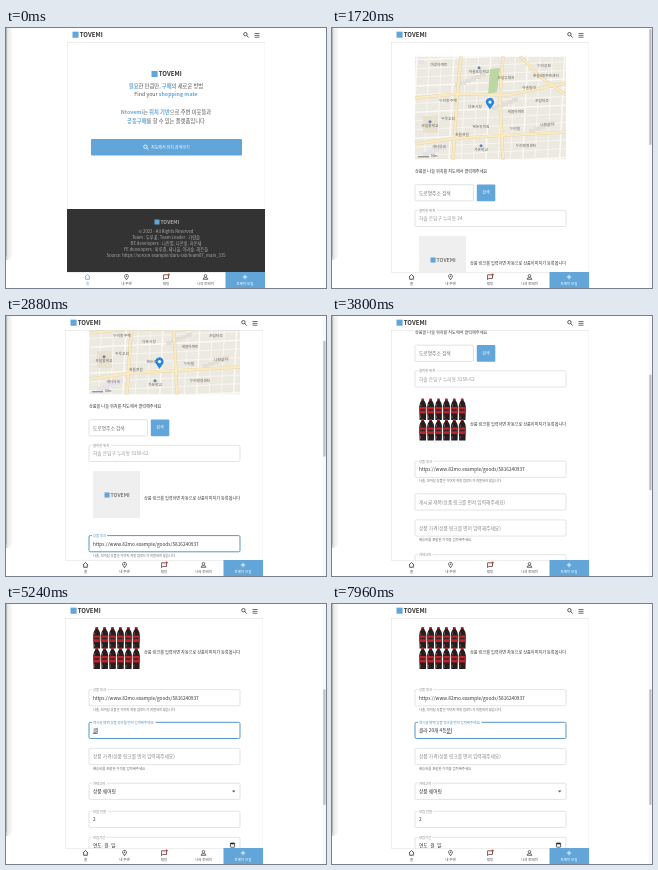
An HTML page with a canvas that plays this animation: 320 px wide and 260 px high, repeating every 8000 ms.

```html
<!DOCTYPE html>
<html lang="ko">
<head>
<meta charset="utf-8">
<style>
  html, body { margin: 0; width: 100%; height: 100%; overflow: hidden; background: #fff; }
  canvas { display: block; width: 320px; height: 260px; }
</style>
</head>
<body>
<canvas id="stage"></canvas>
<script>
const W = 320, H = 260, LOOP = 8000;
const BLUE = '#62a6d9', INK = '#333', GRAY = '#888', LINE = '#d0d0d0';
const FONT = '"Noto Sans CJK KR", "Noto Sans CJK", "Noto Sans", sans-serif';
const BRAND = 'TOVEMI';

const canvas = document.getElementById('stage');
const ctx = canvas.getContext('2d');
const dpr = window.devicePixelRatio || 1;
canvas.width = W * dpr;
canvas.height = H * dpr;

// Moments of the interaction, in ms
const OPEN = 560, MAP_READY = 920, PICK = 1800;
const LINK_FOCUS = 2640, LINK_PASTE = 2880, PHOTO = 3160, LINK_BLUR = 3440;
const TITLE_FOCUS = 4760;
const SCROLLS = [[1920, 2300, 0, 53], [3440, 3780, 53, 127.5], [4040, 4560, 127.5, 187]];
const KEYS = [
  [5080, 'ㅋ', 1], [5140, '코', 1], [5200, '콜', 1], [5360, '콜ㄹ', 1], [5480, '콜라', 1],
  [5720, '콜라 '], [5960, '콜라 2'], [6120, '콜라 20'], [6360, '콜라 20ㄱ', 1],
  [6480, '콜라 20개', 1], [6760, '콜라 20개'], [6960, '콜라 20개 '], [7160, '콜라 20개 4'],
  [7360, '콜라 20개 4ㄷ', 1], [7440, '콜라 20개 4드', 1], [7520, '콜라 20개 4등', 1],
  [7720, '콜라 20개 4등ㅂ', 1], [7800, '콜라 20개 4등부', 1], [7880, '콜라 20개 4등분', 1]
];

const clamp = v => Math.max(0, Math.min(1, v));
const span = (t, a, b) => clamp((t - a) / (b - a));
const ease = v => v * v * (3 - 2 * v);
const mix = (a, b, k) => a + (b - a) * k;

function box(x, y, w, h, color) {
  ctx.fillStyle = color;
  ctx.fillRect(x, y, w, h);
}

function round(x, y, w, h, r, fill, stroke, width = .5) {
  ctx.beginPath();
  ctx.roundRect(x, y, w, h, r);
  if (fill) { ctx.fillStyle = fill; ctx.fill(); }
  if (stroke) { ctx.strokeStyle = stroke; ctx.lineWidth = width; ctx.stroke(); }
}

function path(points, color, width, close) {
  ctx.beginPath();
  points.forEach(([x, y]) => ctx.lineTo(x, y));
  if (close) ctx.closePath();
  ctx.strokeStyle = color;
  ctx.lineWidth = width;
  ctx.stroke();
}

function disc(x, y, r, fill, stroke, width) {
  ctx.beginPath();
  ctx.arc(x, y, r, 0, 7);
  if (fill) { ctx.fillStyle = fill; ctx.fill(); }
  if (stroke) { ctx.strokeStyle = stroke; ctx.lineWidth = width; ctx.stroke(); }
}

function setFont(size, weight = 400) {
  ctx.font = `${weight} ${size}px ${FONT}`;
}

function text(str, x, y, size, color = INK, align = 'left', weight = 400) {
  setFont(size, weight);
  ctx.textAlign = align;
  ctx.textBaseline = 'alphabetic';
  ctx.fillStyle = color;
  ctx.fillText(str, x, y + size * .36);
}

// Centered line; parts between asterisks are blue and bold
function richLine(str, cx, y, size) {
  const parts = str.split('*').map((s, i) => ({ s, hot: i % 2 }));
  let total = 0;
  for (const p of parts) {
    setFont(size, p.hot ? 700 : 400);
    total += p.w = ctx.measureText(p.s).width;
  }
  let x = cx - total / 2;
  for (const p of parts) {
    text(p.s, x, y, size, p.hot ? BLUE : '#555', 'left', p.hot ? 700 : 400);
    x += p.w;
  }
}

function logo(x, y, size, color = INK) {
  box(x, y - size * .5, size, size, BLUE);
  text(BRAND, x + size * 1.18, y, size, color, 'left', 700);
}

function searchIcon(x, y, color, s = 1) {
  disc(x - .6 * s, y - .6 * s, 1.7 * s, null, color, .8 * s);
  path([[x + .7 * s, y + .7 * s], [x + 2.6 * s, y + 2.6 * s]], color, .9 * s);
}

function header(dx) {
  box(59 + dx, 0, 198, 14, '#fff');
  box(59 + dx, 14, 198, .5, '#d8d8d8');
  logo(64.5 + dx, 6.7, 6.1);
  searchIcon(238 + dx, 6.8, INK);
  for (let i = 0; i < 3; i++) box(246.5 + dx, 5 + i * 1.9, 5, .7, INK);
}

function nav(dx, home, t) {
  const left = 59 + dx, y = 249;
  box(left, 244, 198, 16, '#fff');
  box(left, 244, 198, .5, '#ddd');
  const xs = [79.5, 118.5, 158, 197.5, 237].map(x => x + dx);
  const first = home ? BLUE : INK;
  path([[xs[0] - 2.6, y], [xs[0], y - 2.5], [xs[0] + 2.6, y]], first, .8);
  path([[xs[0] - 1.8, y - .4], [xs[0] - 1.8, y + 2.3], [xs[0] + 1.8, y + 2.3], [xs[0] + 1.8, y - .4]], first, .8);
  ctx.beginPath();
  ctx.arc(xs[1], y - .8, 1.9, Math.PI * .85, Math.PI * 2.15);
  ctx.lineTo(xs[1], y + 2.8);
  ctx.closePath();
  ctx.strokeStyle = INK; ctx.lineWidth = .7; ctx.stroke();
  disc(xs[1], y - .8, .6, INK);
  path([[xs[2] - 2.4, y + 2.7], [xs[2] - 2.4, y - 2.2], [xs[2] + 2.5, y - 2.2], [xs[2] + 2.5, y + 1.4], [xs[2] - 1.2, y + 1.4]], '#5b3038', .8, true);
  disc(xs[2] + 2.7, y - 2.4, 1.1, '#d9363e');
  disc(xs[3], y - 1.2, 1.3, null, INK, .7);
  path([[xs[3] - 2.4, y + 2.3], [xs[3] - 2, y + 1.1], [xs[3], y + .6], [xs[3] + 2, y + 1.1], [xs[3] + 2.4, y + 2.3]], INK, .7, true);
  box(left + 158.5, 244, 39.5, 16, BLUE);
  const ripple = span(t, 160, 760);
  if (ripple > 0 && ripple < 1) {
    ctx.save();
    ctx.beginPath();
    ctx.rect(left + 158.5, 244, 39.5, 16);
    ctx.clip();
    disc(xs[4], 252, 4 + 22 * ripple, `rgba(255,255,255,${.3 * (1 - ripple)})`);
    ctx.restore();
  }
  box(xs[4] - 2.3, y - .4, 4.6, .8, '#fff');
  box(xs[4] - .4, y - 2.3, .8, 4.6, '#fff');
  ['홈', '내 주변', '채팅', '나의 토베미', '토베미 모집'].forEach((s, i) =>
    text(s, xs[i], 255.6, 3.5, i === 4 ? '#fff' : i ? '#555' : home ? BLUE : '#555', 'center'));
}

function homePage() {
  logo(145.5, 46, 6.1);
  richLine('*필요*한 만큼만, *구매*의 새로운 방법', 160, 58, 5.3);
  richLine('Find your *shopping mate*', 160, 66.3, 5.3);
  richLine('*Ntovemi*는 *위치 기반*으로 주변 이웃들과', 160, 84.5, 5.3);
  richLine('*공동구매*를 할 수 있는 플랫폼입니다', 160, 92.7, 5.3);
  round(85, 111, 151, 16.5, 1, BLUE);
  searchIcon(140, 119.3, '#fff');
  text('지도에서 위치 검색하기', 145, 119.3, 4, '#fff');
  box(61, 181, 198, 63, '#333');
  logo(148.5, 194, 5, '#aaa');
  ['© 2023 - All Rights Reserved', 'Team : 두루꽃, Team Leader : 가람솔',
    'BE developers : 나린별, 다온빛, 라온새', 'FE developers : 마루결, 새나울, 아라숲, 해든들',
    'Source: https://sorcen.example/duru-lab/team07_main_315']
    .forEach((s, i) => text(s, 160, 203 + i * 6.1, 4.25, '#aaa', 'center'));
}

const PLACES = [
  ['마루아파트', 107, 37], ['하솔초등학교', 147, 44], ['은담우체국', 174, 50], ['누리공원', 212, 38],
  ['한들4동주민센터', 214, 48], ['하솔빌라', 197, 60], ['누리동 주택', 116, 73], ['다온시장', 143, 79],
  ['은담타운', 210, 73], ['새봄아파트', 184, 84], ['두루교회', 116, 91], ['은담중학교', 98, 98],
  ['해든유치원', 149, 99], ['누리빌', 183, 101], ['나린상가', 215, 97], ['한들연립', 130, 107],
  ['누리행정센터', 194, 118], ['가온학교', 149, 122], ['새터약국', 107, 119]
];

function drawMap(t) {
  ctx.save();
  ctx.beginPath();
  ctx.rect(83, 28.5, 151, 103);
  ctx.clip();
  box(83, 28.5, 151, 103, '#ece9e1');
  if (t >= MAP_READY) {
    for (let i = 0; i < 13; i++) {
      const x = 85 + i * 12.3, y = 28 + i * 8.7;
      path([[x, 28], [x - 5, 132]], '#faf9f5', i % 3 ? .8 : 1.5);
      path([[83, y + 4], [234, y - 3]], '#faf9f5', i % 3 ? .8 : 1.5);
    }
    for (let i = 0; i < 22; i++)
      box(86 + (i * 37) % 143, 32 + (i * 23) % 94, 6, 4, i % 4 ? '#e3dfd6' : '#e5e2eb');
    box(91, 88, 15, 17, '#e8e1d0');
    ctx.beginPath();
    [[158, 41], [168, 40], [165, 64], [156, 66]].forEach(p => ctx.lineTo(...p));
    ctx.fillStyle = '#bcd7a4';
    ctx.fill();
    const roads = [
      [[83, 70], [125, 66], [177, 67], [234, 55]], [[129, 28], [125, 70], [121, 132]],
      [[171, 28], [168, 70], [171, 132]], [[83, 116], [125, 110], [234, 104]],
      [[188, 28], [207, 48], [234, 67]]
    ];
    roads.forEach(r => path(r, '#ddd0ad', 3.2));
    roads.forEach(r => path(r, '#fbeac0', 2.5));
    for (const [s, x, y] of PLACES) {
      text(s, x, y, 3.7, '#65615c', 'center');
      if (s.endsWith('학교')) disc(x, y - 4.2, 1.5, '#6684b4');
    }
    box(86, 128.5, 11, .7, '#444');
    text('50m', 99, 128, 3.2, '#444');
    const [x, y] = t < PICK ? [158, 81.5] : [153.5, 106];
    ctx.beginPath();
    ctx.arc(x, y - 7.4, 4.1, Math.PI * .87, Math.PI * 2.13);
    ctx.lineTo(x, y);
    ctx.closePath();
    ctx.fillStyle = '#2485dd';
    ctx.fill();
    disc(x, y - 7.4, 1.6, '#fff');
  }
  ctx.restore();
}

function field(y, label, value, { x = 83, w = 151, float = 1, focus = false, color = INK } = {}) {
  const edge = focus ? '#5796c7' : LINE;
  round(x, y, w, 16.2, 1.3, '#fff', edge, focus ? 1 : .6);
  if (label) {
    const size = mix(4.75, 3.4, float);
    setFont(size);
    if (float > .5) box(x + 3, y - 1, ctx.measureText(label).width + 2, 2, '#fff');
    text(label, x + 4, mix(y + 8.1, y + .2, float), size, focus ? '#5796c7' : GRAY);
  }
  if (value) text(value, x + 4, y + 8.3, 4.75, color);
}

function bottle(x, y) {
  round(x + 2.3, y, 2.8, 2.2, .5, '#c02126');
  ctx.beginPath();
  ctx.moveTo(x + 2.5, y + 1.8);
  ctx.lineTo(x + 5, y + 1.8);
  ctx.quadraticCurveTo(x + 7.4, y + 5, x + 7.3, y + 8);
  ctx.lineTo(x + 7, y + 21.5);
  ctx.lineTo(x + .6, y + 21.5);
  ctx.lineTo(x + .2, y + 8);
  ctx.quadraticCurveTo(x + .2, y + 5, x + 2.5, y + 1.8);
  ctx.fillStyle = '#291e1f';
  ctx.fill();
  box(x + .4, y + 8.5, 6.8, 6.5, '#bd2329');
  box(x + 1.2, y + 10.8, 4.9, 1.4, '#302022');
  box(x + 1.4, y + 5.5, .7, 2.5, '#78645c');
  box(x + 1.2, y + 17, .7, 3, '#78645c');
}

function photo() {
  for (let row = 0; row < 2; row++)
    for (let i = 0; i < 6; i++) bottle(87 + i * 7.9, 210 + row * 20.5);
}

function titleField(t) {
  const y = 305.3, focus = t >= TITLE_FOCUS;
  const key = KEYS.filter(k => k[0] <= t).pop();
  const value = key ? key[1] : '';
  field(y, '게시글 제목(상품 링크를 먼저 입력해주세요)', value,
    { float: ease(span(t, TITLE_FOCUS, TITLE_FOCUS + 200)), focus });
  if (!focus) return;
  setFont(4.75);
  const end = 87 + ctx.measureText(value).width;
  if (key && key[2]) {
    const w = ctx.measureText(value.slice(-1)).width;
    box(end - w, y + 11, w, .6, INK);
  }
  const last = key ? key[0] : TITLE_FOCUS;
  if ((t - last) % 1000 < 500) box(end + .2, y + 5.5, .45, 5.6, INK);
}

function formPage(t, scroll) {
  ctx.save();
  ctx.beginPath();
  ctx.rect(59, 14, 198, 230);
  ctx.clip();
  ctx.translate(0, -scroll);
  drawMap(t);
  text('상품을 나눌 위치를 지도에서 클릭해주세요', 83, 144, 4.15);
  field(156.7, '', '도로명주소 검색', { w: 58.5, color: '#777' });
  round(144.8, 156.5, 18.5, 16.7, 1, BLUE);
  text('검색', 154, 164.8, 4, '#fff', 'center');
  const address = t < MAP_READY ? '' : '하솔 은담구 누리동 ' + (t < PICK ? '24' : '3158-62');
  field(182.3, '클릭한 위치', address, { color: '#999' });
  if (t < PHOTO) {
    box(87, 208, 47, 47, '#efefef');
    logo(98.5, 232, 5.1, '#777');
  } else photo();
  text('상품 링크를 입력하면 자동으로 상품이미지가 등록됩니다', 138, 236, 4.15);
  field(272.6, '상품 링크', t < LINK_PASTE ? '' : 'https://www.82mo.example/goods/5816240937', {
    float: ease(span(t, LINK_FOCUS, LINK_FOCUS + 200)),
    focus: t >= LINK_FOCUS && t < LINK_BLUR
  });
  text('나솔, 모아담 상품은 이미지 자동 업로드가 지원되지 않습니다.', 87, 292.7, 3.3, '#666');
  titleField(t);
  field(331.4, '상품 가격(상품 링크를 먼저 입력해주세요)', '', { float: 0 });
  text('배송비를 포함한 가격을 입력해주세요', 87, 351.3, 3.4, '#666');
  field(366.2, '카테고리', '상품 쉐어링');
  ctx.beginPath();
  [[226, 373.6], [229.4, 373.6], [227.7, 375.4]].forEach(p => ctx.lineTo(...p));
  ctx.fillStyle = '#555';
  ctx.fill();
  field(394.3, '모집 인원', '2');
  field(420.3, '모집기간', '연도. 월. 일.');
  round(224.4, 426, 4.2, 4.2, .4, null, '#222', .7);
  box(224.4, 426, 4.2, 1.3, '#222');
  ctx.restore();
}

function windowEdge() {
  const g = ctx.createLinearGradient(0, 0, 7, 0);
  g.addColorStop(0, '#c9c9c9');
  g.addColorStop(.3, '#ececec');
  g.addColorStop(1, '#fbfbfb');
  round(-10, -10, 16.5, 242, 6, g);
  box(0, 0, .6, 228, '#aaa');
}

function draw(t) {
  ctx.setTransform(dpr, 0, 0, dpr, 0, 0);
  box(0, 0, W, H, '#fff');
  windowEdge();
  const home = t < OPEN, dx = home ? 2 : 0;
  let scroll = 0;
  for (const [a, b, from, to] of SCROLLS)
    if (t >= a) scroll = mix(from, to, ease(span(t, a, b)));
  box(59 + dx, 0, .5, H, '#dedede');
  box(256.5 + dx, 0, .5, H, '#efefef');
  if (home) homePage();
  else formPage(t, scroll);
  header(dx);
  nav(dx, home, t);
  if (!home) {
    box(316.5, 0, 3.5, H, '#f8f8f8');
    round(317.3, 1 + scroll * .45, 2.2, 116, 1.1, '#bebebe');
  }
}

const start = performance.now();
function tick() {
  draw((performance.now() - start) % LOOP);
  requestAnimationFrame(tick);
}
tick();
</script>
</body>
</html>
```
